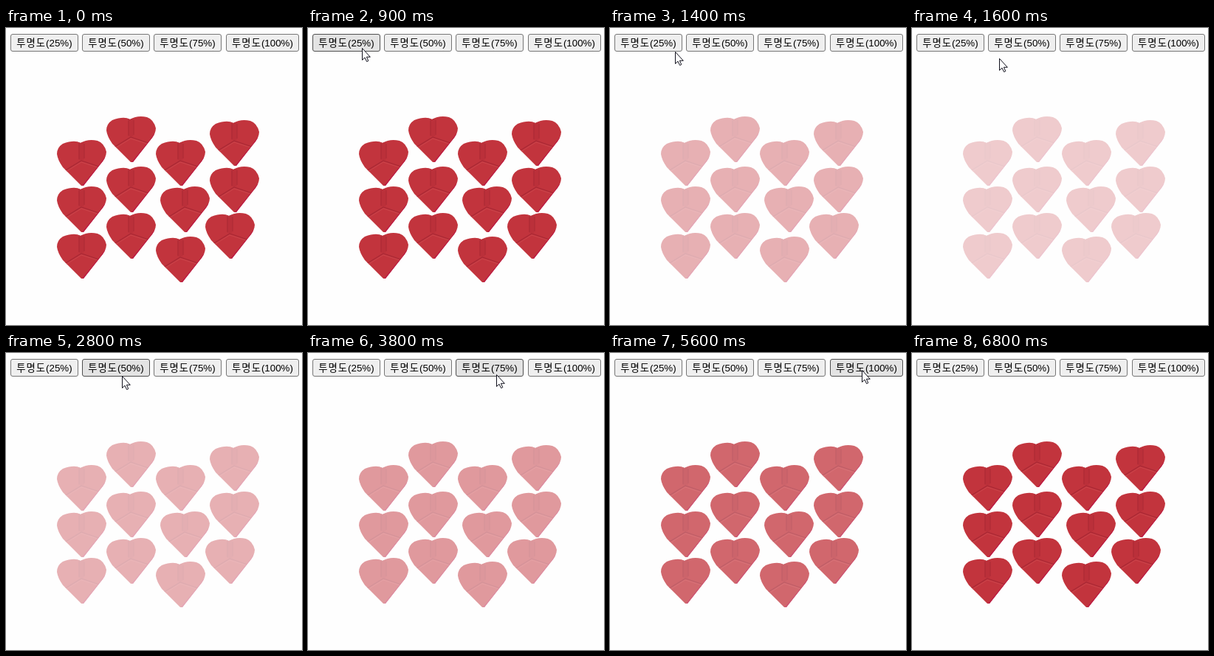
Write an HTML page with a canvas that moves like this. It is 401 px wide and 403 px high and loops after 7.3 s.

```html
<!DOCTYPE html>
<html lang="ko">
<head>
<meta charset="utf-8">
<style>
  html, body { margin: 0; width: 100%; height: 100%; overflow: hidden; background: #fefefe; }
  canvas { position: absolute; left: 0; top: 0; pointer-events: none; }
  .btn {
    position: absolute; top: 8px; height: 24px; box-sizing: border-box;
    border: 1px solid #767676; border-radius: 3px; background: #efefef; color: #000;
    font: 13.333px/24px "Liberation Sans", Arial, sans-serif;
    text-align: center; white-space: nowrap; cursor: default;
  }
  .btn span {
    font: 350 13.333px/0 "Noto Sans CJK KR", "Noto Sans CJK", sans-serif;
    letter-spacing: 1px;
  }
  .btn.over { background: #e3e3e3; border-color: #4f4f4f; }
</style>
</head>
<body>
<canvas id="stage" width="401" height="403"></canvas>
<script>
const LOOP = 7300, STEP = 100, FADE = 720;
const stage = document.getElementById('stage');
const ctx = stage.getContext('2d');
const levels = [25, 50, 75, 100];
const clicks = [880, 2420, 4210, 5690];

// Pointer stops: arrival, departure, x, y
const stops = [
  [100, 100, 373, 49], [300, 300, 144, 55], [600, 1300, 73, 27], [1600, 1600, 118, 41],
  [2200, 2900, 157, 31], [3200, 3200, 223, 49], [3500, 3700, 252, 33],
  [4000, 5000, 260, 22], [5500, 5800, 341, 23], [6700, 6700, 388, 28]
];

const outline = new Path2D(
  'M32 5 Q24 0 8 6 Q0 11 0 20 Q1 28 8 38 L33 63 L36 63 L58 35 Q67 25 67 17 Q64 5 55 2 Q42 -1 32 5Z'
);
const arrow = new Path2D('M.5 .5 V16.5 L4 13.2 L6.6 18.6 L8.8 17.6 L6.4 12.3 H11.3Z');

const buttons = levels.map((level, i) => {
  const el = document.createElement('div');
  const left = Math.round(6 + 97.2 * i);
  const width = 78 + 7 * String(level).length;
  el.className = 'btn';
  el.style.left = left + 'px';
  el.style.width = width + 'px';
  el.innerHTML = `<span>투명도</span>(${level}%)`;
  document.body.insertBefore(el, stage);
  return { el, left, right: left + width };
});

// Staggered columns; a few hearts sit slightly off the lattice.
function heartAt(col, row) {
  const shift = row < 2 && col + row > 2 ? 6 : 0;
  const spread = (col === 2 && row === 2) - (col === 1 && row === 0);
  return [69 + 67 * col + shift, 151 + 63 * row - 27 * (col % 2) + 5 * spread];
}

function makeHeart() {
  const cv = document.createElement('canvas');
  cv.width = 68;
  cv.height = 66;
  const c = cv.getContext('2d');
  const crease = (color, width, d) => {
    c.strokeStyle = color;
    c.lineWidth = width;
    c.stroke(new Path2D(d));
  };
  c.fillStyle = '#c2343d';
  c.fill(outline);
  c.clip(outline);
  crease('#bb303a', 7, 'M33 4 V28');
  crease('#a92834', 1, 'M30 6 V27 M37 6 V26');
  crease('#a92834', 1.2, 'M10 43 L33 29 L57 37');
  crease('#cb454b', 1, 'M12 44 L33 31 L55 38');
  crease('#bd1c45', 3, 'M35 64 L58 36 L67 24');
  return cv;
}

const heart = makeHeart();

const ease = p => 0.5 - Math.cos(p * Math.PI) / 2;

function opacityAt(t) {
  let a = 1;
  clicks.forEach((start, i) => {
    const p = Math.min(1, Math.max(0, (t - start) / FADE));
    a += (levels[i] / 100 - a) * ease(p);
  });
  return a;
}

function pointerAt(t) {
  const i = stops.findIndex(s => t <= s[1]);
  if (i < 0 || t < stops[0][0]) return null;
  const [arrive, , x, y] = stops[i];
  if (t >= arrive) return [x, y];
  const [, leave, px, py] = stops[i - 1];
  const p = (t - leave) / (arrive - leave);
  return [Math.round(px + (x - px) * p), Math.round(py + (y - py) * p)];
}

function drawPointer([x, y]) {
  ctx.save();
  ctx.translate(x, y);
  ctx.lineJoin = 'round';
  ctx.fillStyle = '#fff';
  ctx.strokeStyle = '#10101c';
  ctx.fill(arrow);
  ctx.stroke(arrow);
  ctx.restore();
}

function draw(now) {
  const t = Math.floor((now % LOOP) / STEP) * STEP;
  const tip = pointerAt(t);
  ctx.clearRect(0, 0, stage.width, stage.height);
  ctx.globalAlpha = opacityAt(t);
  for (let row = 0; row < 3; row++) {
    for (let col = 0; col < 4; col++) ctx.drawImage(heart, ...heartAt(col, row));
  }
  ctx.globalAlpha = 1;
  for (const b of buttons) {
    const over = tip && tip[0] >= b.left && tip[0] < b.right && tip[1] < 32;
    b.el.classList.toggle('over', !!over);
  }
  if (tip) drawPointer(tip);
}

const begin = performance.now();
function tick() {
  draw(performance.now() - begin);
  requestAnimationFrame(tick);
}
tick();
</script>
</body>
</html>
```
